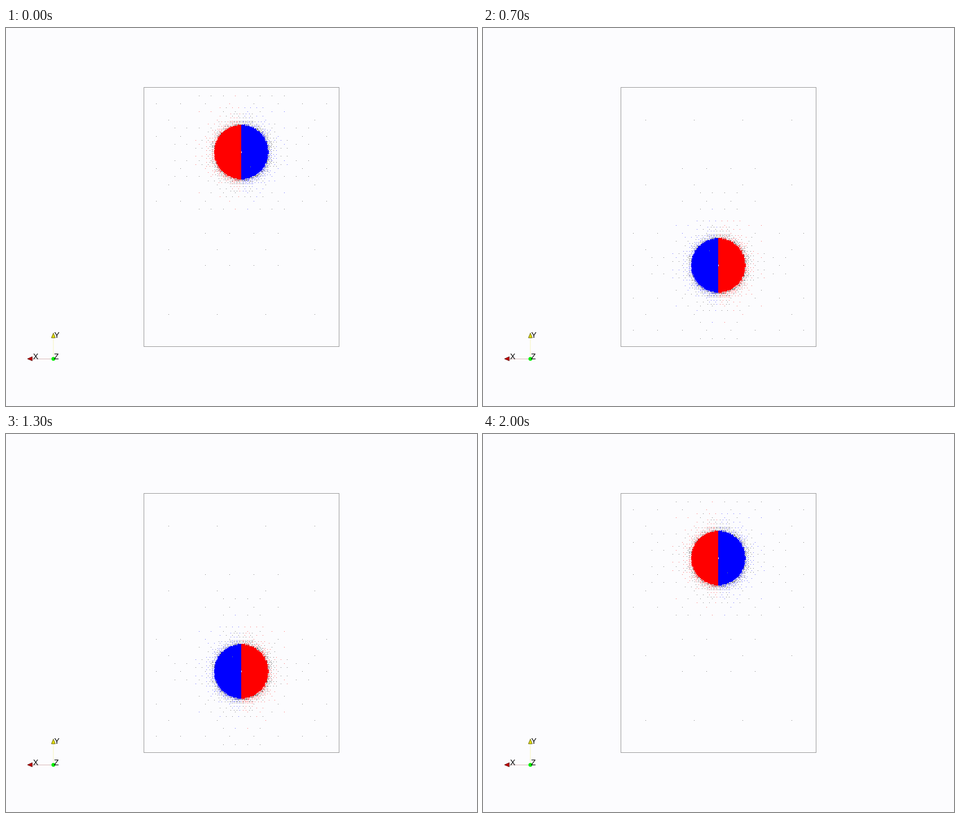
Recreate the animation shown at these times as an HTML page with a canvas. Size 835 by 671 pixels, loop 2100 ms.

```html
<!DOCTYPE html>
<html lang="en">
<head>
<meta charset="utf-8">
<title>Rotating disc on an adaptive mesh</title>
<style>
html, body { margin: 0; width: 100%; height: 100%; overflow: hidden; background: #fcfcfe; }
canvas { display: block; }
</style>
</head>
<body>
<canvas id="stage" width="835" height="671"></canvas>
<script>
const ctx = document.getElementById('stage').getContext('2d');
const BOX = { x: 245.25, y: 105.85, w: 344.88, h: 459.84 };
const CX = BOX.x + BOX.w / 2, STEP = BOX.h / 16, RADIUS = 48;
const RED = '#ff0000', BLUE = '#0000ff';
// A cell splits when it comes closer to the disc centre than its level's reach.
const REACH = [118.5, 88.5, 67.5, 59.5, 53, RADIUS];

const clamp = (v, lo, hi) => Math.min(hi, Math.max(lo, v));
const noise = (x, y) => {
  const n = Math.sin(x * 12.9898 + y * 78.233) * 43758.5453;
  return n - Math.floor(n);
};

function rect(color, x, y, w, h) {
  ctx.fillStyle = color;
  ctx.fillRect(x, y, w, h);
}

function shape(color, points, edge) {
  ctx.beginPath();
  points.forEach(([x, y]) => ctx.lineTo(x, y));
  ctx.closePath();
  ctx.fillStyle = color;
  ctx.fill();
  ctx.strokeStyle = edge;
  ctx.lineWidth = 0.8;
  ctx.stroke();
}

function drawAxes() {
  rect('#d9b8b8', 47, 587, 35, 1);
  rect('#f5f3bd', 83.5, 550, 1, 35);
  shape('#c40000', [[38, 587.3], [46.5, 583.5], [46.5, 590.8]], '#500000');
  shape('#e0dc00', [[84, 541.5], [80.5, 550], [87.5, 550]], '#55520a');
  ctx.fillStyle = '#00ee00';
  ctx.beginPath();
  ctx.arc(84, 587.3, 3.4, 0, Math.PI * 2);
  ctx.fill();
  ctx.fillStyle = '#000';
  ctx.font = '14px "Liberation Sans", Arial, sans-serif';
  ctx.fillText('X', 48, 588);
  ctx.fillText('Y', 85.5, 550);
  ctx.fillText('Z', 85, 588);
}

function drawMesh(cy, turn) {
  const dirX = -Math.cos(turn), dirY = Math.sin(turn);
  const side = (x, y) => (x - CX) * dirX + (y - cy) * dirY > 0 ? RED : BLUE;
  const solid = [];

  function dot(x, y, d) {
    const tinted = d < 105 && noise(x, y - cy) < 0.55;
    ctx.globalAlpha = d < 56 ? 0.8 : 0.6;
    rect(tinted ? side(x, y) : '#222', Math.floor(x), Math.floor(y), 1, 1);
  }

  function visit(x, y, w, h, level) {
    const mx = x + w / 2, my = y + h / 2;
    const d = Math.hypot(mx - CX, my - cy);
    if (level === 6 && d < RADIUS) {
      solid.push([x, y, w, h, side(mx, my)]);
      return;
    }
    dot(mx, my, d);
    const dx = Math.max(0, Math.abs(mx - CX) - w / 2);
    const dy = Math.max(0, Math.abs(my - cy) - h / 2);
    if (level === 6 || Math.hypot(dx, dy) >= REACH[level]) return;
    for (let i = 0; i < 4; i++) {
      visit(x + (i % 2) * w / 2, y + (i >> 1) * h / 2, w / 2, h / 2, level + 1);
    }
  }

  const w = BOX.w / 4, h = BOX.h / 4;
  for (let i = 0; i < 16; i++) {
    visit(BOX.x + (i % 4) * w, BOX.y + (i >> 2) * h, w, h, 0);
  }
  ctx.globalAlpha = 1;
  // The tiny nudge keeps cells that share an edge on the same pixel.
  const snap = v => Math.floor(v + 1e-6);
  for (const [x, y, cw, ch, color] of solid) {
    const l = snap(x), t = snap(y);
    rect(color, l, t, snap(x + cw) - l, snap(y + ch) - t);
  }
}

function draw(pos) {
  const cy = BOX.y + (4 + pos) * STEP;
  const turn = clamp(pos - 1, 0, 6) * Math.PI / 6;
  rect('#fcfcfe', 0, 0, 835, 671);
  drawMesh(cy, turn);

  const mid = Math.floor(cy);
  rect('#f4e8f4', 417, mid - 1, 1, 3);
  const s = turn < Math.PI / 4 ? 1 : -1;
  rect('#80a060', 417 + 16 * s, mid + 26 * s, 1, 1);

  ctx.strokeStyle = '#9c9c9c';
  ctx.lineWidth = 1;
  ctx.strokeRect(244.5, 105.5, 346, 460);
  drawAxes();
}

let shown = -1;
function tick(now) {
  const step = Math.floor((now % 2100) / 100);
  const pos = 10 - Math.abs(10 - step);
  if (pos !== shown) {
    shown = pos;
    draw(pos);
  }
  requestAnimationFrame(tick);
}
draw(0);
requestAnimationFrame(tick);
</script>
</body>
</html>
```
